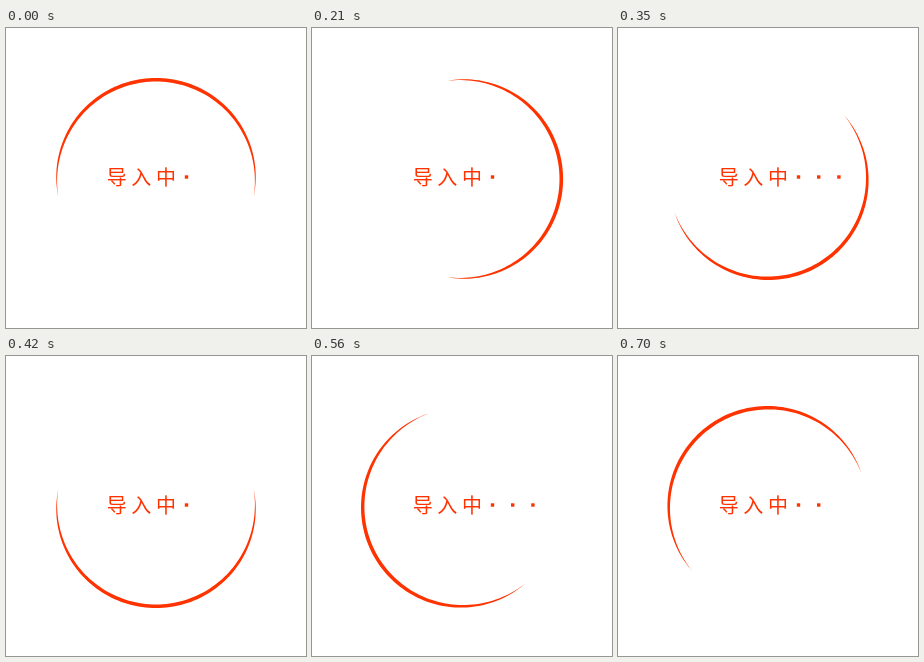
Animation, 300 px wide and 300 px high, one loop 770 ms. Source, as an HTML page with a canvas:

```html
<!DOCTYPE html>
<html lang="zh">
<head>
<meta charset="utf-8">
<style>
  html, body { margin: 0; width: 100%; height: 100%; overflow: hidden; background: #fff; }
  canvas { display: block; }
</style>
</head>
<body>
<canvas id="stage" width="300" height="300"></canvas>
<script>
const ctx = document.getElementById('stage').getContext('2d');
const STEP_MS = 70, STEPS = 11;
const COLOR = '#ff3300';
const CENTER = { x: 150, y: 151 };
const RADIUS = 99.3, HALF_SPAN = 100.5, HALF_WIDTH = 1.8;
const rad = deg => deg * Math.PI / 180;

// A 200 degree arc, thick in the middle and pointed at both ends.
function drawArc(heading) {
  const edge = (offset, side) => {
    const taper = 1 - Math.pow(Math.abs(offset) / HALF_SPAN, 2.4);
    const r = RADIUS + side * HALF_WIDTH * taper;
    const a = rad(heading + offset);
    ctx.lineTo(CENTER.x + r * Math.cos(a), CENTER.y + r * Math.sin(a));
  };
  ctx.beginPath();
  for (let i = -50; i <= 50; i++) edge(i / 50 * HALF_SPAN, 1);
  for (let i = 50; i >= -50; i--) edge(i / 50 * HALF_SPAN, -1);
  ctx.closePath();
  ctx.fill();
}

function drawLabel(dots) {
  ctx.font = '500 20px "Noto Sans CJK SC", "Noto Sans CJK", sans-serif';
  [...'导入中'].forEach((char, i) => ctx.fillText(char, 110.7 + i * 24.6, 156.5));
  for (let i = 0; i < dots; i++) ctx.fillRect(178.8 + i * 20.2, 147.3, 3.4, 3.4);
}

function draw(now) {
  const step = Math.floor(now / STEP_MS) % STEPS;
  // The last step skips one twelfth of the turn.
  const turn = step === STEPS - 1 ? step + 1 : step;
  ctx.fillStyle = '#fff';
  ctx.fillRect(0, 0, 300, 300);
  ctx.fillStyle = COLOR;
  ctx.textAlign = 'center';
  drawArc(turn * 30 - 90);
  drawLabel(step % 3 + 1);
}

const start = performance.now();
function tick() {
  draw(performance.now() - start);
  requestAnimationFrame(tick);
}
tick();
</script>
</body>
</html>
```
